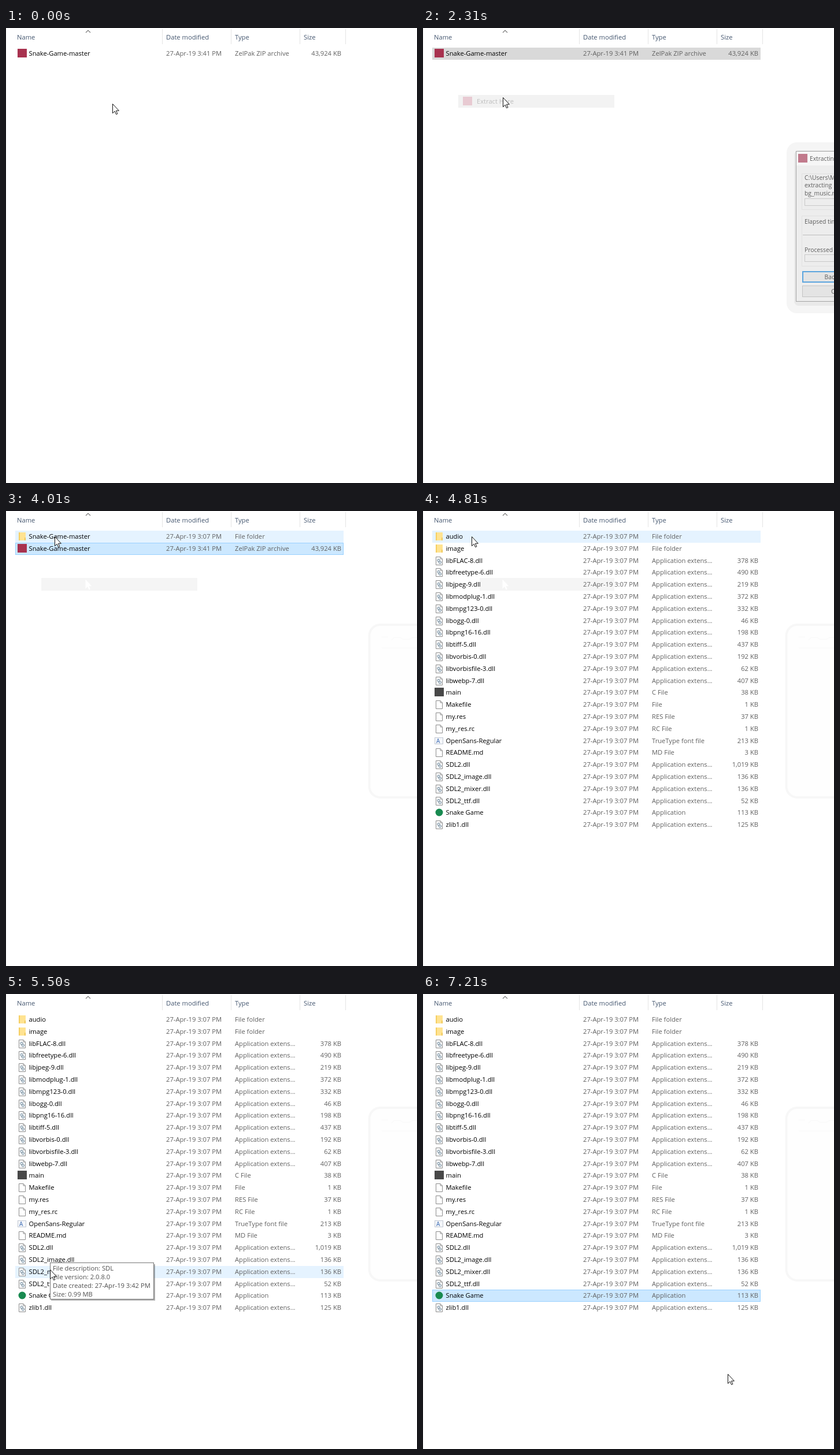
Write an HTML page that moves like this. It is 711 px wide and 788 px high and loops after 7.82 s.

```html
<!DOCTYPE html>
<html lang="en">
<head>
<meta charset="utf-8">
<title>Unpacking an archive</title>
<style>
  html, body { margin: 0; width: 100%; height: 100%; overflow: hidden; background: #fff; }
  svg { display: block; }
  text { font: 11.2px "Open Sans", "Noto Sans", "Noto Sans Thai", sans-serif; white-space: pre; }
  .head { fill: #44566f; }
  .info { fill: #606060; }
  .tip { fill: #505050; }
  .bold { font-weight: 700; }
  .small { font-size: 10.3px; }
  .end { text-anchor: end; }
</style>
</head>
<body>
<svg id="stage" width="711" height="788" viewBox="0 0 711 788"></svg>
<script>
const LOOP = 7820, PITCH = 20.8, TOP = 34, ITEM = 21.8;
const BLUE = ['#cce8ff', '#99d1ff'], GRAY = ['#d9d9d9', '#d9d9d9'];

const rect = (x, y, w, h, fill, extra = '') =>
  `<rect x="${x}" y="${y}" width="${w}" height="${h}" fill="${fill}" ${extra}/>`;
const text = (x, y, s, cls = '') => `<text x="${x}" y="${y}" class="${cls}">${s}</text>`;
const line = (d, color, w = 1) => `<path d="${d}" fill="none" stroke="${color}" stroke-width="${w}"/>`;
const group = (id, body) => `<g id="${id}">${body}</g>`;

// Icons are drawn in a 16 by 16 box.
const page = '<path d="M2.5 1.5H10L13.5 5V15.5H2.5Z" fill="#fff" stroke="#8c8c8c"/><path d="M10 1.5V5H13.5" fill="none" stroke="#8c8c8c"/>';
const icons = {
  zip: rect(0, 0, 16, 15, '#a8324f'),
  folder: rect(2, 1, 12, 14, '#ffe391') + rect(2, 1, 2, 14, '#f5cf62') + rect(12, 10, 2, 5, '#f0c75a'),
  dll: page + '<g fill="#dfe8ee" stroke="#718899"><circle cx="7" cy="7.5" r="2.2"/><circle cx="9.4" cy="11" r="2.2"/></g>',
  file: page,
  code: rect(0, 0, 16, 15, '#484848'),
  font: rect(0.5, 2.5, 14, 11, '#f4f6fa', 'stroke="#c3c9d3"') + '<text x="3" y="12" fill="#3767b1" style="font-size:10px">A</text>',
  app: '<circle cx="8" cy="8" r="6.5" fill="#188a50"/>',
  edit: rect(0.5, 1, 14, 14, '#b9d98a'),
  guard: rect(0, 0, 16, 15, '#0078d7'),
  share: line('M5 5H1.5V13.5H12V10M4 10.5C4.5 7 7 5.5 10 5.5V2.5L14.5 6.5L10 10.2V7.8C7 7.8 5.5 8.5 4 10.5Z', '#444')
};
const icon = (name, x, y) => `<g transform="translate(${x} ${y})">${icons[name]}</g>`;

const rowTop = i => Math.round(TOP + i * PITCH);
const fileRow = ([pic, name, kind, size, time = '3:07'], i) => {
  const y = rowTop(i) + 14;
  return icon(pic, 20, rowTop(i) + 2) + text(39.5, y, name) +
    text(277, y, `27-Apr-19 ${time} PM`, 'info') + text(396, y, kind, 'info') +
    (size ? text(580, y, size + ' KB', 'info end') : '');
};

const dll = (name, size) => ['dll', name + '.dll', 'Application extens...', size];
const archive = ['zip', 'Snake-Game-master', 'ZelPak ZIP archive', '43,924', '3:41'];
const lists = [
  [archive],
  [['folder', 'Snake-Game-master', 'File folder'], archive],
  [
    ['folder', 'audio', 'File folder'],
    ['folder', 'image', 'File folder'],
    dll('libFLAC-8', 378), dll('libfreetype-6', 490), dll('libjpeg-9', 219),
    dll('libmodplug-1', 372), dll('libmpg123-0', 332), dll('libogg-0', 46),
    dll('libpng16-16', 198), dll('libtiff-5', 437), dll('libvorbis-0', 192),
    dll('libvorbisfile-3', 62), dll('libwebp-7', 407),
    ['code', 'main', 'C File', 38],
    ['file', 'Makefile', 'File', 1],
    ['file', 'my.res', 'RES File', 37],
    ['file', 'my_res.rc', 'RC File', 1],
    ['font', 'OpenSans-Regular', 'TrueType font file', 213],
    ['file', 'README.md', 'MD File', 3],
    dll('SDL2', '1,019'), dll('SDL2_image', 136), dll('SDL2_mixer', 136), dll('SDL2_ttf', 52),
    ['app', 'Snake Game', 'Application', 113],
    dll('zlib1', 125)
  ]
];

const header = rect(0, 0, 1, 788, '#f3f3f3') +
  [['Name', 19], ['Date modified', 277], ['Type', 396], ['Size', 515]].map(([s, x]) => text(x, 20, s, 'head')).join('') +
  [270, 389, 508, 587].map(x => rect(x, 2, 1, 26, '#e4e4e4')).join('') +
  line('M138 8L142 4L146 8', '#777', 1.1);

// Menu entries: label, icon, submenu arrow; null is a separator.
const entries = [
  ['Open'], ['Open with ZelPak', 'zip'], ['Extract files...', 'zip'], ['Extract Here', 'zip'],
  ['Extract to Snake-Game-master\\', 'zip'], ['Edit with Notepad++', 'edit'],
  ['สแกนด้วย Tilvane Guardian...', 'guard'], ['Share', 'share'], ['Open with', '', '#5a3a42'], null,
  ['Give access to', '', '#5a3a42'], ['Restore previous versions'], null,
  ['Send to', '', '#2a73ad'], null,
  ['Cut'], ['Copy'], null,
  ['Create shortcut'], ['Delete'], ['Rename'], null,
  ['Properties']
];
const entry = ([label, pic, arrow], y, cls = '') =>
  (pic ? icon(pic, 69, Math.round(y - 7.5)) : '') + text(93, Math.round(y + 4), label, cls) +
  (arrow ? line(`M315.5 ${y - 6}L322 ${y}L315.5 ${y + 6}`, arrow) : '');

function menu() {
  let y = 61.3, body = '';
  entries.forEach((e, i) => {
    if (e) {
      body += entry(e, y, i ? '' : 'bold');
      y += ITEM;
    } else {
      body += rect(69, Math.round(y - 7.9), 254, 1, '#919191');
      y += 6.9;
    }
  });
  return rect(62, 50, 273, 434, '#000', 'opacity=".18"') + rect(61, 49, 273, 434, '#000', 'opacity=".35"') +
    rect(58.5, 46.5, 274, 435, '#f1f1f1', 'stroke="#a0a0a0"') +
    rect(61, 50, 270, ITEM, '#cdcdcd', 'id="hot"') + body;
}

const frame = (x, y, w, h, color, fill = 'none', sw = 1) =>
  rect(x, y, w, h, fill, `stroke="${color}" stroke-width="${sw}"`);
const dialog = frame(645.5, 213.5, 90, 260, '#777', '#f0f0f0') +
  rect(646, 214, 70, 24, '#fff') + icon('zip', 649, 218) + text(669, 230, 'Extracting from', 'small') +
  frame(655.5, 252.5, 90, 62, '#dcdcdc') + frame(655.5, 325.5, 90, 87, '#dcdcdc') +
  [['C:\\Users\\Mila', 263], ['extracting', 276], ['bg_music.mp3', 290], ['Elapsed time', 339], ['Processed', 388]]
    .map(([s, y]) => text(660, y, s, 'small')).join('') +
  frame(660.5, 295.5, 80, 12, '#b4b4b4', '#f0f0f0') + frame(660.5, 392.5, 80, 12, '#b4b4b4', '#f0f0f0') +
  rect(657, 358, 60, 1, '#a0a0a0') +
  frame(657, 422, 90, 18, '#0078d7', '#e1e1e1', 2) + text(694.5, 435, 'Background', 'small') +
  frame(656.5, 446.5, 90, 19, '#adadad', '#e1e1e1') + text(706, 460, 'Cancel', 'small');
const shadow = rect(629, 198, 110, 296, '#f5f5f5', 'rx="18"') + rect(642, 212, 80, 269, '#e9e9e9', 'rx="8"');
const trace = rect(628.5, 197, 110, 299, '#fefefe', 'rx="19" stroke="#f7f7f7" stroke-width="4"') +
  line('M650 237H711M650 218H661M667 224L671 219H682L686 222H698L703 219H711', '#f8f8f8');

const tooltip = rect(78, 468, 180, 63, '#000', 'opacity=".3"') + frame(76.5, 465.5, 179, 63, '#767676', '#fff') +
  ['File description: SDL', 'File version: 2.0.8.0', 'Date created: 27-Apr-19 3:42 PM', 'Size: 0.99 MB']
    .map((s, i) => text(81, Math.round(479.2 + i * 14.8), s, 'tip')).join('');

const arrow = 'M.5 .5V16.6L4.2 13.1L6.6 18.6L8.9 17.6L6.5 12.2H11.4Z';

document.getElementById('stage').innerHTML = header +
  rect(16, TOP, 568, 21, '#e5f3ff', 'id="hover"') +
  rect(16.5, TOP + 0.5, 567, 20, BLUE[0], 'id="pick"') +
  group('band', rect(61, 116, 270, 22, '#f5f5f5', 'id="strip"') +
    `<path id="pale" d="${arrow}" transform="translate(137 118)" fill="#fff"/>`) +
  lists.map((l, i) => group('list' + i, l.map(fileRow).join(''))).join('') +
  group('trace', trace) +
  group('flash', rect(61, 116, 270, 22, '#cdcdcd') + entry(entries[3], 126.7)) +
  group('menu', menu()) + group('shadow', shadow) + group('dialog', dialog) + group('tooltip', tooltip) +
  `<path id="cursor" d="${arrow}" fill="#fff" stroke="#111" stroke-linejoin="round"/>`;

const el = {};
document.querySelectorAll('[id]').forEach(n => el[n.id] = n);
const set = (name, attrs) => { for (const k in attrs) el[name].setAttribute(k, attrs[k]); };
const fade = (name, o) => set(name, { opacity: o, visibility: o ? 'visible' : 'hidden' });

// Cursor moves: start, end, steps, x, y.
const moves = [
  [150, 610, 7, 58, 46], [1220, 1610, 6, 138, 120], [3550, 4010, 7, 84, 44],
  [5040, 5270, 4, 76, 446], [5500, 5500, 1, 76, 477], [5580, 5890, 5, 76, 523],
  [6670, 7210, 8, 527, 658]
];
function cursorAt(t) {
  let x = 184, y = 131;
  for (const [a, b, n, tx, ty] of moves) {
    if (t < a) break;
    const k = n < 2 ? 1 : Math.min(n, 1 + Math.floor((t - a + 8) / (b - a) * (n - 1)));
    const p = 1 - (1 - k / n) ** 1.5;
    x += (tx - x) * p;
    y += (ty - y) * p;
  }
  return [Math.round(x), Math.round(y)];
}

const stepAt = (table, t) => table.reduce((v, s) => t >= s[0] ? s[1] : v, table[0][1]);
const views = [[0, 0], [3250, 1], [4650, 2]];
const picks = [[0, null], [760, [0, BLUE]], [2230, [0, GRAY]], [3250, [1, BLUE]], [4410, [0, BLUE]], [4650, null], [6270, [23, BLUE]]];
const fades = {
  menu: [[0, 0], [760, .25], [840, .5], [920, .75], [1000, 1], [2070, 0]],
  flash: [[0, 0], [2070, .9], [2150, .65], [2230, .4], [2300, .25], [2380, .2], [2460, 0]],
  band: [[0, 0], [2460, 1], [5040, 0]],
  pale: [[0, 0], [3550, 1], [5040, 0]],
  shadow: [[0, 0], [2230, .5], [2300, 1], [2930, .5], [3000, 0]],
  dialog: [[0, 0], [2230, .25], [2300, .6], [2380, .85], [2460, 1], [2930, .4], [3000, 0]],
  trace: [[0, 0], [2930, 1]],
  tooltip: [[0, 0], [5350, .5], [5420, 1], [5890, .5], [5970, 0]]
};

function draw(t) {
  const [x, y] = cursorAt(t), view = stepAt(views, t), pick = stepAt(picks, t);
  for (const name in fades) fade(name, stepAt(fades[name], t));
  lists.forEach((_, i) => fade('list' + i, i === view ? 1 : 0));

  const row = Math.floor((y - TOP) / PITCH);
  const blocked = t >= 760 && t < 3250 || t >= 4650 && t < 4730;
  const over = !blocked && row >= 0 && row < lists[view].length && x < 584 && !(pick && pick[0] === row);
  fade('hover', over ? 1 : 0);
  set('hover', { y: rowTop(row) });
  fade('pick', pick ? 1 : 0);
  if (pick) set('pick', { y: rowTop(pick[0]) + 0.5, fill: pick[1][0], stroke: pick[1][1] });

  // The highlight hides with its menu.
  const hot = y > 50 && t >= 760 && t < 2070;
  fade('hot', hot ? 1 : 0);
  set('hot', { y: Math.round(50.4 + Math.floor((y - 50) / ITEM) * ITEM) });
  const left = view === 2 ? 98 : 61;
  set('strip', { x: left, width: 331 - left });
  set('cursor', { transform: `translate(${x} ${y})` });
}

const start = performance.now();
function tick() {
  draw((performance.now() - start) % LOOP);
  requestAnimationFrame(tick);
}
tick();
</script>
</body>
</html>
```
